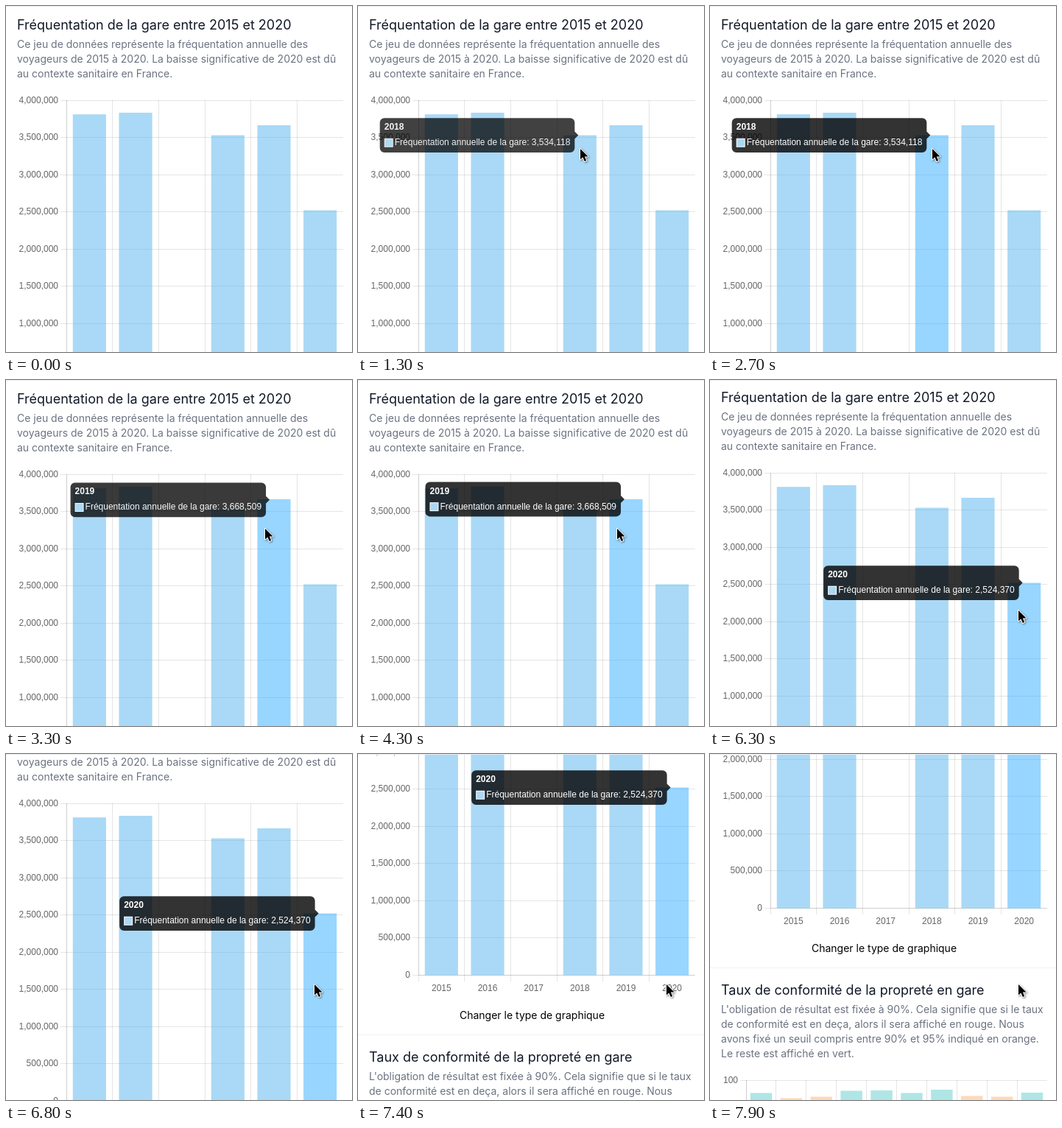
Write an HTML page with a canvas that moves like this. It is 470x470 px and loops after 8 s.

```html
<!DOCTYPE html>
<html lang="fr">
<head>
<meta charset="utf-8">
<title>Fréquentation de la gare</title>
<style>
html, body { margin: 0; width: 100%; height: 100%; overflow: hidden; background: #fff; }
canvas { display: block; width: 470px; height: 470px; }
</style>
</head>
<body>
<canvas id="stage"></canvas>
<script>
const SIZE = 470, LOOP = 8000, STEP = 100;
const INTER = 'Inter, sans-serif';
const ARIAL = '"Liberation Sans", Arial, sans-serif';
const GRID = 'rgba(0,0,0,0.1)';
const BAR = 'rgba(84,180,238,0.5)', BAR_HOVER = 'rgba(51,173,255,0.5)';
const TEAL = 'rgba(97,205,203,0.5)', ORANGE = 'rgba(255,179,113,0.5)';

const visits = [3815000, 3837000, 0, 3534118, 3668509, 2524370];
const chart = { left: 82, right: 458, top: 128, bottom: 532 };
const band = (chart.right - chart.left) / visits.length;

// Each hover: bar index, tooltip start and end, highlight start
const hovers = [
  { bar: 3, from: 1100, to: 3000, lit: 2700 },
  { bar: 4, from: 3100, to: 4500, lit: 3100 },
  { bar: 5, from: 4710, to: 9000, lit: 4710 }
];
const FADE = 215, SLIDE = 400;

// Cursor moves: start, end, destination
const moves = [
  [600, 1200, 302, 194],
  [2700, 3200, 352, 202],
  [4300, 4900, 421, 314],
  [5790, 5800, 420, 313],
  [5990, 6000, 419, 313]
];

const scrolls = [
  [6300, 2], [6400, 4], [6500, 6],
  [6800, 61], [6900, 112], [7000, 153], [7100, 183], [7200, 200],
  [7400, 232], [7500, 268], [7600, 290], [7900, 323]
];

const canvas = document.getElementById('stage');
const ctx = canvas.getContext('2d');
const dpr = window.devicePixelRatio || 1;
canvas.width = canvas.height = SIZE * dpr;

const clamp = v => Math.max(0, Math.min(1, v));
const mix = (a, b, p) => a + (b - a) * p;
const easeInOut = p => p < 0.5 ? 2 * p * p : 1 - 2 * (1 - p) ** 2;
const easeOutQuart = p => 1 - (1 - p) ** 4;
const centerOf = i => chart.left + band * (i + 0.5);
const topOf = i => chart.bottom + 0.5 - visits[i] * 101e-6;

function text(str, x, y, font, color, align = 'left') {
  ctx.font = font;
  ctx.fillStyle = color;
  ctx.textAlign = align;
  ctx.fillText(str, x, y);
}

function rect(x, y, w, h, color) {
  ctx.fillStyle = color;
  ctx.fillRect(x, y, w, h);
}

const hLine = (x1, x2, y) => rect(x1, y, x2 - x1, 1, GRID);
const vLine = (x, y1, y2) => rect(x, y1, 1, y2 - y1, GRID);

function section(title, lines, y) {
  text(title, 15, y, '18px ' + INTER, '#111827');
  lines.forEach((line, i) => text(line, 15, y + 25 + 20 * i, '14px ' + INTER, '#6b7280'));
}

function drawVisits(t) {
  const { left, right, top, bottom } = chart;
  const small = '12px ' + ARIAL;
  for (let i = 0; i <= 8; i++) {
    const y = Math.floor(top + 50.5 * i);
    hLine(left - 8, right, y);
    text((4e6 - 5e5 * i).toLocaleString('en-US'), left - 11, y + 4, small, '#666', 'right');
  }
  visits.forEach((v, i) => {
    vLine(Math.floor(left + band * i), top, bottom + 9);
    text(2015 + i, centerOf(i), bottom + 22, small, '#666', 'center');
  });
  vLine(left, top, bottom);
  hLine(left, right, bottom);
  const lit = hovers.find(h => t >= h.lit && t < h.to);
  const w = band * 0.72;
  visits.forEach((v, i) => {
    const y = topOf(i);
    rect(centerOf(i) - w / 2, y, w, bottom + 0.5 - y, lit && lit.bar === i ? BAR_HOVER : BAR);
  });
}

function drawCleanliness() {
  const left = 49, right = 458, top = 766, bottom = 1100;
  const drops = [17.5, 24.5, 22.5, 14.5, 14, 17.5, 13, 21.5, 22.5, 17];
  const step = (right - left) / drops.length, w = step * 0.72;
  hLine(left - 8, right, top);
  text('100', left - 11, top + 4, '12px ' + ARIAL, '#666', 'right');
  vLine(left, top, bottom);
  drops.forEach((d, i) => {
    const x = left + step * i;
    vLine(Math.floor(x), top, bottom);
    rect(x + (step - w) / 2, top + d, w, bottom - top, d > 20 ? ORANGE : TEAL);
  });
}

function tooltipState(t) {
  let alpha = 0, last = null, pos = null;
  for (const h of hovers) {
    if (t < h.from) break;
    const goal = { x: centerOf(h.bar) - 7, y: topOf(h.bar) };
    const start = last ? clamp(alpha - (h.from - last.to) / FADE) : 0;
    const p = easeOutQuart(clamp((t - h.from) / SLIDE));
    pos = pos ? { x: mix(pos.x, goal.x, p), y: mix(pos.y, goal.y, p) } : goal;
    alpha = mix(start, 1, clamp((t - h.from) / FADE));
    last = h;
  }
  if (last && t > last.to) alpha = clamp(alpha - (t - last.to) / FADE);
  return last && { ...pos, alpha, bar: last.bar };
}

function drawTooltip(t) {
  const tip = tooltipState(t);
  if (!tip || !tip.alpha) return;
  const label = 'Fréquentation annuelle de la gare: ' + visits[tip.bar].toLocaleString('en-US');
  ctx.font = '12px ' + ARIAL;
  const w = ctx.measureText(label).width + 26, h = 46.8;
  const x = tip.x - w, y = tip.y - h / 2;
  ctx.save();
  ctx.globalAlpha = tip.alpha;
  ctx.fillStyle = 'rgba(0,0,0,0.8)';
  ctx.beginPath();
  ctx.roundRect(x, y, w, h, 6);
  ctx.moveTo(tip.x, tip.y - 5);
  ctx.lineTo(tip.x + 5, tip.y);
  ctx.lineTo(tip.x, tip.y + 5);
  ctx.fill();
  text(2015 + tip.bar, x + 6, y + 16, 'bold 12px ' + ARIAL, '#fff');
  rect(x + 6, y + 27.6, 12, 12, '#fff');
  rect(x + 7, y + 28.6, 10, 10, '#a9d9f6');
  text(label, x + 20, y + 37, '12px ' + ARIAL, '#fff');
  ctx.restore();
}

function drawCursor(t) {
  let x = 312, y = -25;
  for (const [from, to, toX, toY] of moves) {
    const p = easeInOut(clamp((t - from) / (to - from)));
    x = mix(x, toX, p);
    y = mix(y, toY, p);
  }
  ctx.save();
  ctx.translate(Math.round(x), Math.round(y));
  const arrow = new Path2D('M0 0V14.6L3.4 11.5L5.8 17L8.2 16L5.9 10.6H10.6Z');
  ctx.lineJoin = 'round';
  ctx.lineWidth = 2;
  ctx.strokeStyle = '#fff';
  ctx.shadowColor = 'rgba(0,0,0,0.45)';
  ctx.shadowBlur = 2.5 * dpr;
  ctx.shadowOffsetX = ctx.shadowOffsetY = dpr;
  ctx.stroke(arrow);
  ctx.shadowColor = 'transparent';
  ctx.fillStyle = '#000';
  ctx.fill(arrow);
  ctx.restore();
}

function draw(t) {
  const scroll = scrolls.reduce((s, [at, y]) => t >= at ? y : s, 0);
  ctx.setTransform(dpr, 0, 0, dpr, 0, 0);
  rect(0, 0, SIZE, SIZE, '#fff');
  ctx.save();
  ctx.translate(0, -scroll);
  section('Fréquentation de la gare entre 2015 et 2020', [
    'Ce jeu de données représente la fréquentation annuelle des',
    'voyageurs de 2015 à 2020. La baisse significative de 2020 est dû',
    'au contexte sanitaire en France.'
  ], 32);
  drawVisits(t);
  text('Changer le type de graphique', 236.5, 592, '14px ' + INTER, '#000', 'center');
  rect(0, 613, SIZE, 1, '#f0f1f3');
  section('Taux de conformité de la propreté en gare', [
    "L'obligation de résultat est fixée à 90%. Cela signifie que si le taux",
    'de conformité est en deça, alors il sera affiché en rouge. Nous',
    'avons fixé un seuil compris entre 90% et 95% indiqué en orange.',
    'Le reste est affiché en vert.'
  ], 650);
  drawCleanliness();
  drawTooltip(t);
  ctx.restore();
  rect(0, 0, SIZE, 1, '#ebecee');
  drawCursor(t);
}

const begin = performance.now();
function tick() {
  const t = (performance.now() - begin) % LOOP;
  draw(Math.floor(t / STEP) * STEP);
  requestAnimationFrame(tick);
}
tick();
</script>
</body>
</html>
```
